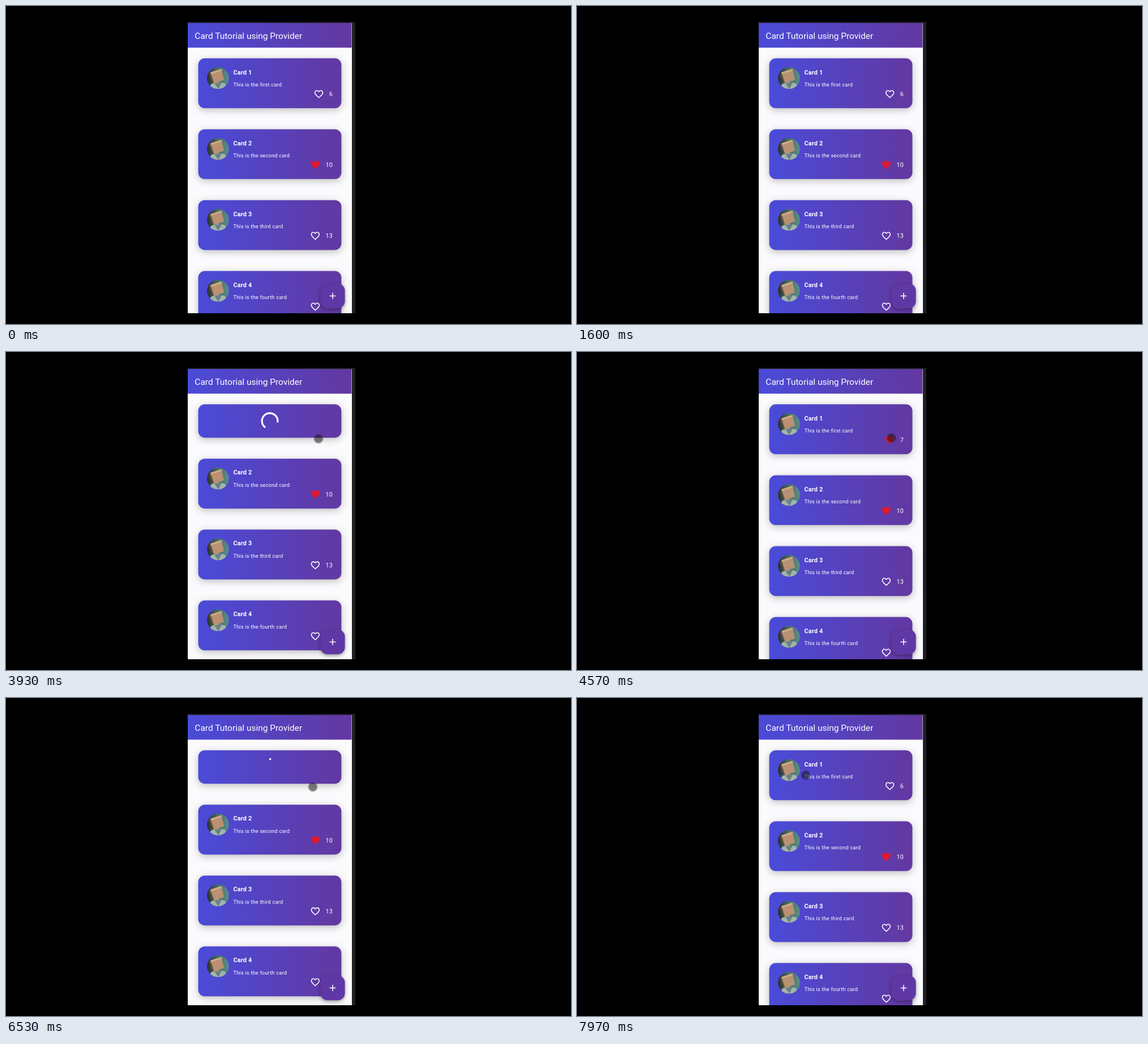
Animation, 998 px wide and 561 px high, one loop 8 s. Source, as an HTML page:

```html
<!DOCTYPE html>
<html lang="en">
<head>
<meta charset="utf-8">
<title>Card tutorial</title>
<style>
  html, body { margin: 0; width: 100%; height: 100%; overflow: hidden; background: #000; }
  svg { display: block; width: 100%; height: 100%; }
  text { font-family: Roboto, sans-serif; fill: #fff; }
  .title { font-size: 20px; }
  .name { font-size: 14px; font-weight: 700; letter-spacing: .25px; }
  .note { font-size: 12px; letter-spacing: .25px; }
  .count { font-size: 14px; letter-spacing: .25px; text-anchor: end; }
  .panel { fill: url(#purple); filter: drop-shadow(0 4px 8px rgba(0, 0, 0, .25)); }
  .fab { fill: #6038a5; filter: drop-shadow(0 3px 4px rgba(0, 0, 0, .35)); }
</style>
</head>
<body>
<svg viewBox="0 0 998 561">
  <defs>
    <linearGradient id="purple">
      <stop offset="0" stop-color="#4a4bd9"/>
      <stop offset="1" stop-color="#6338a0"/>
    </linearGradient>
    <linearGradient id="backdrop">
      <stop offset="0" stop-color="#26302f"/>
      <stop offset=".45" stop-color="#456a66"/>
      <stop offset="1" stop-color="#5b8f8a"/>
    </linearGradient>
    <radialGradient id="touch">
      <stop offset="0" stop-color="#141418" stop-opacity=".56"/>
      <stop offset=".72" stop-color="#141418" stop-opacity=".53"/>
      <stop offset="1" stop-color="#141418" stop-opacity=".22"/>
    </radialGradient>
    <clipPath id="screen"><rect x="321" y="30" width="290" height="512"/></clipPath>
    <clipPath id="round"><circle r="25"/></clipPath>
    <g id="avatar" clip-path="url(#round)">
      <rect x="-25" y="-25" width="50" height="50" fill="url(#backdrop)"/>
      <path d="M-22 25L-15 13 0 9 16 12 22 25z" fill="#a3b4ad"/>
      <path d="M-8 12L1 25 9 9z" fill="#68827d"/>
      <path d="M-17-13L8-21 14 4-9 12z" fill="#b99173"/>
      <path d="M-17-13L-9 12-13 8-20-9z" fill="#6d5140"/>
      <path d="M-17-13L8-21 9-17-16-9z" fill="#cfaa8a"/>
    </g>
    <path id="liked" fill="#dc1a32" d="M12 21.35l-1.45-1.32C5.4 15.36 2 12.28 2 8.5 2 5.42 4.42 3 7.5 3c1.74 0 3.41.81 4.5 2.09C13.09 3.81 14.76 3 16.5 3 19.58 3 22 5.42 22 8.5c0 3.78-3.4 6.86-8.55 11.54z"/>
    <path id="unliked" fill="#fff" d="M16.5 3c-1.74 0-3.41.81-4.5 2.09C10.91 3.81 9.24 3 7.5 3 4.42 3 2 5.42 2 8.5c0 3.78 3.4 6.86 8.55 11.54L12 21.35l1.45-1.32C18.6 15.36 22 12.28 22 8.5 22 5.42 19.58 3 16.5 3zm-4.4 15.55l-.1.1-.1-.1C7.14 14.24 4 11.39 4 8.5 4 6.5 5.5 5 7.5 5c1.54 0 3.04.99 3.57 2.36h1.87C13.46 5.99 14.96 5 16.5 5c2 0 3.5 1.5 3.5 3.5 0 2.89-3.14 5.74-7.9 10.05z"/>
  </defs>

  <path d="M320 28H617V542H611V30H320z" fill="#1f1f24"/>
  <g clip-path="url(#screen)">
    <rect x="321" y="30" width="290" height="512" fill="#fbfbfd"/>
    <g transform="translate(321 30.5) scale(.77333)">
      <g id="cards"></g>
      <rect y="-1" width="375" height="56.6" fill="url(#purple)"/>
      <text class="title" x="16" y="35.3">Card Tutorial using Provider</text>
      <rect class="fab" x="303" y="594" width="56" height="56" rx="16"/>
      <path d="M324 622h14M331 615v14" stroke="#fff" stroke-width="2"/>
    </g>
    <rect x="610.3" y="30" width=".7" height="43.5" fill="#d6c8ee"/>
    <circle id="cursor" r="8.6" fill="url(#touch)"/>
  </g>
</svg>
<script>
const LOOP = 8000, LOAD_TIME = 1010;
const LOAD_STARTS = [3130, 6520];
const FULL_HEIGHT = 113.7, LOADING_HEIGHT = 76, CARD_GAP = 48;
// time, x, y of the pointer
const POINTER = [
  [2030, 622, 196], [2360, 556, 157], [2570, 555, 156], [3930, 552, 153],
  [5470, 561, 149], [6530, 542, 157], [7560, 540, 157], [7970, 404, 136], [8000, 397, 135]
];
const $ = id => document.getElementById(id);

function cardContent(number, ordinal, likes, liked) {
  const heartX = likes < 10 ? 299.5 : 291.4;
  return `<use href="#avatar" x="69" y="45"/>
    <text class="name" x="104" y="36.4">Card ${number}</text>
    <text class="note" x="104" y="64.4">This is the ${ordinal} card</text>
    <use href="#${liked ? 'liked' : 'unliked'}" x="${heartX - 12}" y="69.5"/>
    <text class="count" x="331" y="86.6">${likes}</text>`;
}

const spinner = `<circle id="spinner" cx="187.5" cy="38" r="18" pathLength="360" fill="none"
  stroke="#fff" stroke-width="4" stroke-linecap="square"/>`;

function renderCards(state) {
  const firstHeight = state === 'loading' ? LOADING_HEIGHT : FULL_HEIGHT;
  const contents = [
    state === 'loading' ? spinner : cardContent(1, 'first', state === 'liked' ? 7 : 6, state === 'liked'),
    cardContent(2, 'second', 10, true),
    cardContent(3, 'third', 13, false),
    cardContent(4, 'fourth', 11, false)
  ];
  let top = 80;
  $('cards').innerHTML = contents.map((content, i) => {
    const height = i ? FULL_HEIGHT : firstHeight;
    const card = `<g transform="translate(0 ${top})">
      <rect class="panel" x="24" width="327" height="${height}" rx="15"/>${content}</g>`;
    top += height + CARD_GAP;
    return card;
  }).join('');
}

// cubic-bezier(.4, 0, .2, 1), clamped to 0..1
function fastOutSlowIn(x) {
  if (x <= 0) return 0;
  if (x >= 1) return 1;
  let low = 0, high = 1, u = .5;
  for (let i = 0; i < 20; i++) {
    u = (low + high) / 2;
    const at = 1.2 * u * (1 - u) ** 2 + .6 * u * u * (1 - u) + u ** 3;
    if (at < x) low = u; else high = u;
  }
  return 3 * u * u - 2 * u ** 3;
}

function spin(elapsed) {
  const cycle = elapsed / 1333 % 1;
  const head = 270 * fastOutSlowIn(cycle * 2);
  const tail = 270 * fastOutSlowIn(cycle * 2 - 1);
  const start = -90 + tail + elapsed / 2222 * 360 + cycle * 90;
  $('spinner').setAttribute('stroke-dasharray', `${Math.max(head - tail, .06)} 360`);
  $('spinner').setAttribute('transform', `rotate(${start} 187.5 38)`);
}

function movePointer(t) {
  const next = POINTER.findIndex(point => point[0] > t);
  $('cursor').style.display = next > 0 ? '' : 'none';
  if (next < 1) return;
  const [t0, x0, y0] = POINTER[next - 1], [t1, x1, y1] = POINTER[next];
  const p = (t - t0) / (t1 - t0), k = p * p * (3 - 2 * p);
  $('cursor').setAttribute('cx', x0 + (x1 - x0) * k);
  $('cursor').setAttribute('cy', y0 + (y1 - y0) * k);
}

let shown;
function draw(now) {
  const t = now % LOOP;
  const loadStart = LOAD_STARTS.find(start => t >= start && t < start + LOAD_TIME);
  const state = loadStart ? 'loading' : t > LOAD_STARTS[0] && t < LOAD_STARTS[1] ? 'liked' : 'idle';
  if (state !== shown) renderCards(shown = state);
  if (loadStart) spin(t - loadStart);
  movePointer(t);
}

const began = performance.now();
function tick() {
  draw(performance.now() - began);
  requestAnimationFrame(tick);
}
tick();
</script>
</body>
</html>
```
